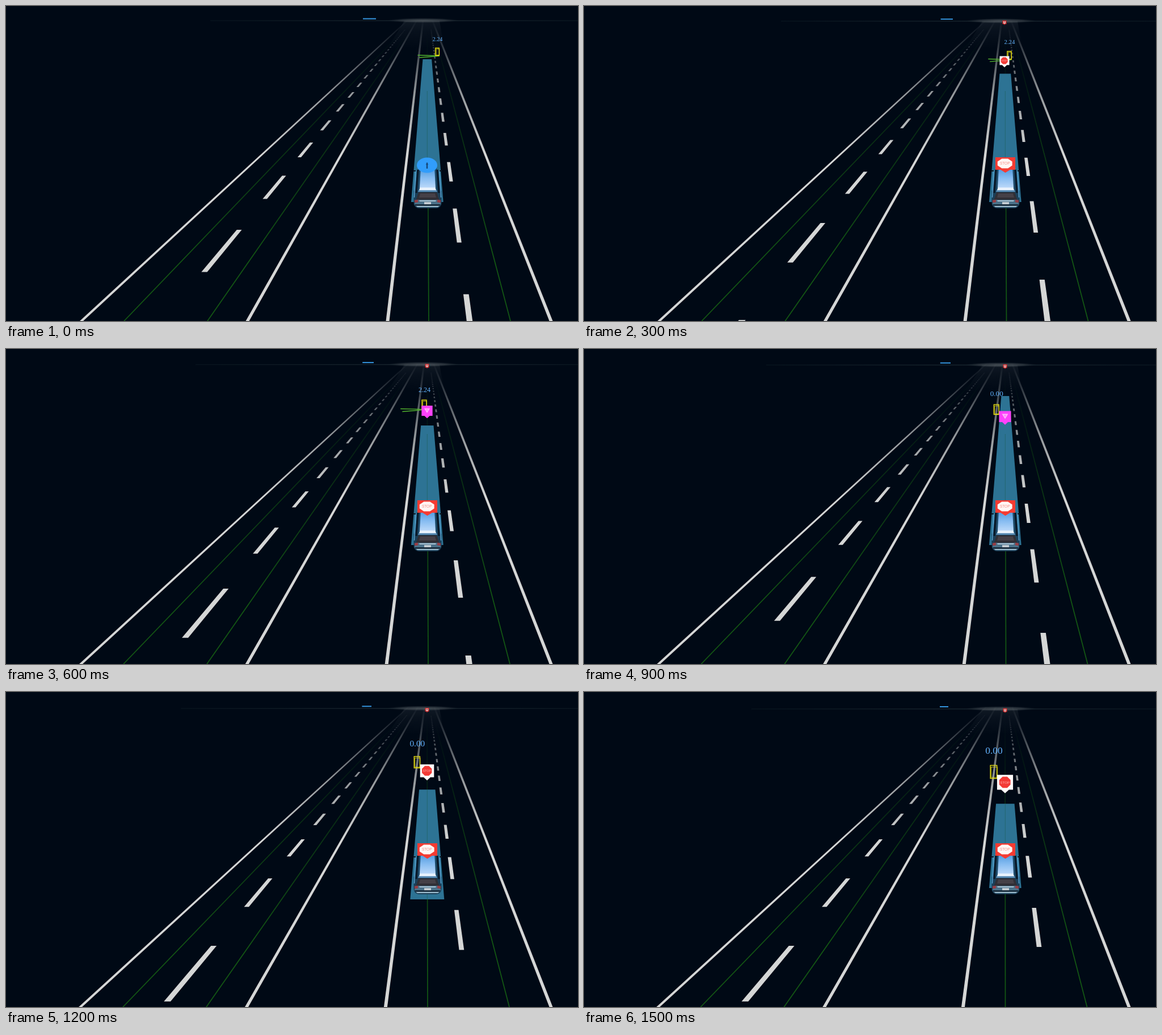
Recreate the animation shown at these times as an HTML page with a canvas. Size 1008 by 556 pixels, loop 1800 ms.

```html
<!DOCTYPE html>
<html lang="en">
<head>
<meta charset="utf-8">
<title>Lane view</title>
<style>
html, body { margin: 0; width: 100%; height: 100%; overflow: hidden; background: #000915; }
canvas { display: block; }
</style>
</head>
<body>
<canvas id="view" width="1008" height="556"></canvas>
<script>
const g = document.getElementById('view').getContext('2d');
const STEP = 300, BOTTOM = 556, VANISH = -1, AXIS = 743;

// travel: road covered, in inverse-depth units; reach: far end of a free path
const steps = [
  { travel: 0, reach: 94 },
  { travel: 7.24, sign: 'stop' },
  { travel: 17.73, sign: 'yield' },
  { travel: 24.54, sign: 'yield', reach: 83 },
  { travel: 35.1, sign: 'stop', tail: 366 },
  { travel: 43.13, sign: 'stop' }
];

const depthY = u => VANISH + 1e4 / u;
const roadX = (x0, top, y) => x0 + (top - x0) * (BOTTOM - y) / (BOTTOM - VANISH);

function trace(p) {
  g.beginPath();
  for (let i = 0; i < p.length; i += 2) g.lineTo(p[i], p[i + 1]);
}

function poly(fill, ...p) {
  trace(p);
  g.fillStyle = fill;
  g.fill();
}

function line(color, width, ...p) {
  trace(p);
  g.strokeStyle = color;
  g.lineWidth = width;
  g.stroke();
}

function oval(fill, x, y, rx, ry) {
  g.beginPath();
  g.ellipse(x, y, rx, ry, 0, 0, Math.PI * 2);
  g.fillStyle = fill;
  g.fill();
}

function octagon(fill, x, y, rx, ry) {
  const p = [];
  for (let i = 0; i < 8; i++) {
    const a = (i + 0.5) * Math.PI / 4;
    p.push(x + rx * Math.cos(a), y + ry * Math.sin(a));
  }
  poly(fill, ...p);
}

// Trapezoid centred on x.
function taper(fill, x1, y1, half1, x2, y2, half2) {
  poly(fill, x1 - half1, y1, x1 + half1, y1, x2 + half2, y2, x2 - half2, y2);
}

function fade(rgb, y0, y1, stops) {
  const f = g.createLinearGradient(0, y0, 0, y1);
  stops.forEach(([at, alpha]) => f.addColorStop(at, `rgba(${rgb},${alpha})`));
  return f;
}

const paint = fade('220,221,220', 24, 264, [[0, 0], [0.16, 0.17], [0.32, 0.4], [0.55, 0.68], [1, 0.97]]);
const lane = fade('19,88,19', 50, 450, [[0, 0], [0.2, 0.2], [0.5, 0.55], [1, 1]]);

function label(text, x, y, size, color, family) {
  g.font = `${size}px ${family}`;
  g.textAlign = 'center';
  g.fillStyle = color;
  g.fillText(text, x, y);
}

function horizon(i) {
  const h = 26 + 0.8 * i, edge = 360 - 13 * i;
  const strip = g.createLinearGradient(edge, 0, 1008, 0);
  strip.addColorStop(0, '#07131d');
  strip.addColorStop(0.6, '#1c2831');
  strip.addColorStop(1, '#0a1620');
  g.fillStyle = strip;
  g.fillRect(edge, h - 0.8, 1008 - edge, 1.4);
  g.save();
  g.translate(735, h - 0.5);
  g.scale(1, 0.07);
  const glow = g.createRadialGradient(0, 0, 5, 0, 0, 62);
  glow.addColorStop(0, 'rgba(80,88,94,.75)');
  glow.addColorStop(0.6, 'rgba(58,66,74,.6)');
  glow.addColorStop(1, 'rgba(40,50,58,0)');
  oval(glow, 0, 0, 62, 62);
  g.restore();
  taper(fade('120,128,134', h, 75, [[0, 0.13], [0.4, 0.06], [1, 0]]), 733, h, 31, 722, 75, 50);
  const y = 22.5 + 0.7 * i;
  line('#3595de', 2, 629 - 0.4 * i, y, 652 - 2 * i, y);
  return h;
}

function dashes(x0, top, phase, period, ratio) {
  for (let u = 5 + (phase - 5) % period + (phase < 5 ? period : 0); u < 240; u += period) {
    const y1 = depthY(u), y2 = depthY(Math.max(u - 4, 14));
    if (y1 > BOTTOM) continue;
    taper(paint, roadX(x0, top, y1), y1, 0.5 + y1 * ratio, roadX(x0, top, y2), y2, 0.5 + y2 * ratio);
  }
}

function road(i, travel) {
  const drift = -0.5 * i, yaw = Math.min(0, i - 3);
  for (const x of [208, 355, 745, 889]) line(lane, 1.7, x + drift, BOTTOM, roadX(x + drift, 742, 50), 50);
  // bottom x, share of the drift, top x
  for (const [x, share, top] of [[133, 1, 739], [425.5, 0.8, 741.5], [672.5, 1.8, 741], [960.5, 0, 744]]) {
    const x0 = x + drift * share;
    taper(paint, roadX(x0, top + yaw, 26), 26, 1.5, x0, BOTTOM, 3);
  }
  dashes(278 + drift, 741.5 + yaw, 25.25 - travel, 8.03, 0.0098);
  dashes(817 + drift / 2, 743.5, 27.9 - travel, 8.28, 0.0085);
}

function ribbon(y1, y2) {
  const half = y => 0.0815 * (y + 2);
  taper('#2d7394', 742.3, y1, half(y1), 742.3, y2, half(y2));
  line('rgba(30,95,85,.55)', 1, 742.3, Math.max(y1, 150), 742.3, y2);
}

function walker(i, travel) {
  const k = 1e4 / (113 - 1.11 * travel), y = VANISH + k;
  const side = 0.203 - 0.125 * i, moving = side > -0.13;
  const x = 742 + k * Math.max(side, -0.131);
  if (moving) {
    line('#53b52e', 1.4, x + 4, y + 0.5, x - 0.39 * k, y - 0.7);
    line('#53b52e', 1.4, x + 3, y + 0.8, x - 0.36 * k, y + 0.04 * k);
  }
  const w = 0.075 * k, h = 0.15 * k;
  g.strokeStyle = '#e6dc12';
  g.lineWidth = 1.4;
  g.strokeRect(x - w / 2, y - h, w, h);
  g.lineWidth = 0.8;
  g.strokeRect(x - w / 2 + 1.5, y - h * 0.87, w - 1, h * 0.8);
  label(moving ? '2.24' : '0.00', x + 0.5, y - 0.283 * k, 0.113 * k, '#62b2fd', '"Liberation Serif", serif');
}

function board(fill, x, y, w, h) {
  const c = x + w / 2, b = y + h;
  poly(fill, x, y, x + w, y, x + w, b, c + w * 0.24, b, c, b + h * 0.24, c - w * 0.24, b, x, b);
}

const stopText = (x, y, size, color) => label('STOP', x, y, size, color, '"Liberation Sans", sans-serif');

function sign(kind, x, tip) {
  const w = 0.156 * (tip - VANISH), h = 0.93 * w, y = tip - 1.17 * w, m = y + h / 2;
  if (kind === 'stop') {
    board('#fffafa', x - w / 2, y, w, h);
    octagon('#f33a36', x - 0.3, m, w * 0.38, h * 0.41);
    stopText(x - 0.3, m + w * 0.08, w * 0.22, '#ffb4b0');
  } else {
    board('#ff42fb', x - w / 2, y, w, h);
    taper('#ffb5fb', x, m - h * 0.24, w * 0.26, x, m + h * 0.22, 0);
    taper('#ff7bfa', x, m - h * 0.14, w * 0.1, x, m + h * 0.05, 0);
  }
}

function farSign(x, y) {
  board('#c92d2f', x - 3.5, y - 3.5, 7, 6.5);
  taper('#ffe4e2', x, y - 2, 2, x, y + 2, 1.5);
  taper('#8a3036', x, y - 1.5, 0.8, x, y + 0.5, 0.8);
}

function car() {
  const slab = (fill, y1, half1, y2, half2) => taper(fill, AXIS, y1, half1, AXIS, y2, half2);
  const sides = (color, width, ...p) => {
    line(color, width, ...p.map((v, i) => i % 2 ? v : AXIS - v));
    line(color, width, ...p.map((v, i) => i % 2 ? v : AXIS + v));
  };
  g.beginPath();
  g.roundRect(AXIS - 24.5, 326, 49, 31, [0, 0, 9, 9]);
  g.fillStyle = '#1b3f58';
  g.fill();
  slab('#1d4a69', 281, 15, 328, 24);
  sides('#0a1a2a', 3.5, 17, 289, 20, 330);
  sides('#5ba4d4', 1.4, 21, 290, 22, 312, 23.5, 338);
  sides('#0b1722', 2, 21, 291, 25, 291);
  const roof = g.createLinearGradient(0, 284, 0, 323);
  roof.addColorStop(0, '#4795dc');
  roof.addColorStop(0.5, '#86bcf1');
  roof.addColorStop(1, '#c1dcfa');
  slab(roof, 283, 12, 321, 14);
  slab('#eaf3fd', 320.5, 13.5, 325, 15);
  slab('#5f90b8', 325, 15.5, 328, 17);
  slab('#302f36', 329, 16, 342, 20.5);
  slab('#454047', 331, 13, 338, 15);
  slab('#4b7189', 342, 21, 350, 23.5);
  sides('#963d45', 4.5, 17, 344, 23, 345);
  slab('#a9c2d2', 343, 15, 345, 14);
  slab('#c3cbd1', 346, 6, 350, 6);
  slab('#142737', 350, 22, 353, 21);
  slab('#9dbdcf', 352.7, 21, 355, 18);
}

function badge(alert) {
  if (alert) {
    board('#f53b32', 725, 267, 35, 22);
    octagon('#fff6f4', 741.7, 278, 14, 9.3);
    stopText(741.7, 280.2, 6.5, '#f58d86');
  } else {
    oval('#319dfb', 742, 281, 18, 13.5);
    line('#174779', 2.4, 742, 276.5, 742, 287);
    line('#174779', 1, 740, 279.5, 744, 279.5);
  }
}

function draw(i) {
  const { travel, sign: kind, reach, tail = 346 } = steps[i];
  const k = 1e4 / (98.6 - travel);
  g.fillStyle = '#000915';
  g.fillRect(0, 0, 1008, BOTTOM);
  const h = horizon(i);
  road(i, travel);
  ribbon(reach || VANISH + 1.1 * k, tail);
  walker(i, travel);
  if (kind) {
    const x = 742 + Math.min(0, i - 2);
    farSign(x, h + 2.2);
    sign(kind, x, VANISH + k);
  }
  car();
  badge(kind);
}

const start = performance.now();
let shown = -1;
function tick() {
  const i = Math.floor((performance.now() - start) / STEP) % steps.length;
  if (i !== shown) draw(shown = i);
  requestAnimationFrame(tick);
}
tick();
</script>
</body>
</html>
```
